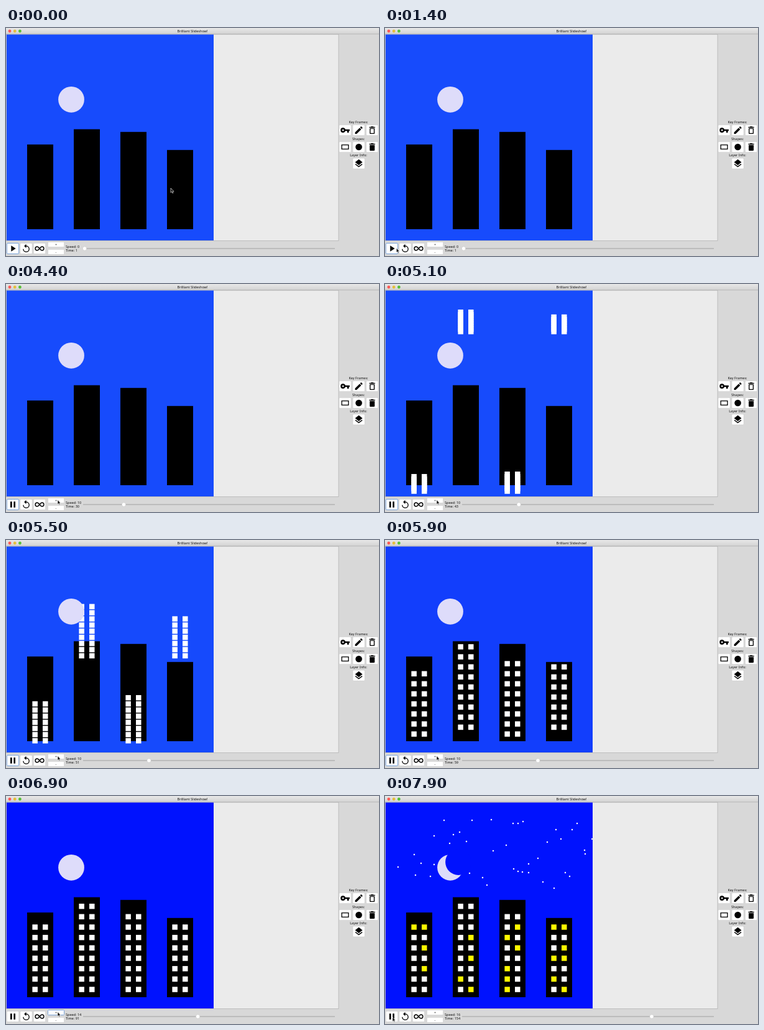
These frames come from a looping animation (600x366 px, 8 s). An HTML page:

```html
<!DOCTYPE html>
<html lang="en">
<head>
<meta charset="utf-8">
<title>Night city</title>
<style>
html, body { margin: 0; width: 100%; height: 100%; overflow: hidden; background: #d8d8d8; }
svg { display: block; width: 100vw; height: 100vh; }
text { font: 5.5px "Noto Sans", "Open Sans", sans-serif; fill: #111; }
.mid { text-anchor: middle; }
.btn { fill: #fff; stroke: #c6c6c6; stroke-width: .5; }
.focus { stroke: #79a3d8; stroke-width: 1; }
</style>
</head>
<body>
<svg viewBox="0 0 600 366">
  <defs>
    <linearGradient id="bar" x2="0" y2="1"><stop stop-color="#e8e8e8"/><stop offset="1" stop-color="#d2d2d2"/></linearGradient>
    <clipPath id="clip"><rect x="1" y="10.5" width="333" height="330.5"/></clipPath>
  </defs>
  <rect width="600" height="366" fill="#d8d8d8"/>
  <rect width="600" height="10" fill="url(#bar)"/>
  <path d="M0 9.7H600" stroke="#b0b0b0" stroke-width=".7"/>
  <circle cx="6" cy="5" r="2.4" fill="#fc5b57"/>
  <circle cx="14.2" cy="5" r="2.4" fill="#e5bf3c"/>
  <circle cx="22.4" cy="5" r="2.4" fill="#57c038"/>
  <text class="mid" x="300" y="7">Brilliant Slideshow!</text>
  <rect x=".5" y="10.2" width="534.5" height="331.3" fill="#ebebeb" stroke="#b5b5b5" stroke-width=".8"/>
  <g id="scene" clip-path="url(#clip)"></g>
  <g id="ui">
    <text class="mid" x="567" y="153">Key Frames:</text>
    <text class="mid" x="567" y="179.5">Shapes:</text>
    <text class="mid" x="567" y="206.3">Layer Info:</text>
    <text id="speed" x="96" y="352.8"></text>
    <text id="time" x="96" y="359.3"></text>
    <path d="M124 354H529" stroke="#a0a0a0" stroke-width="1"/>
    <circle id="thumb" cy="354" r="3.2" fill="#fff" stroke="#bdbdbd" stroke-width=".5"/>
  </g>
  <path id="cursor" d="M0 0V7.2L1.7 5.7 2.9 8.2 4 7.7 2.9 5.3H5z" fill="#111" stroke="#fff" stroke-width=".6"/>
</svg>
<script>
const $ = id => document.getElementById(id);

function add(parent, tag, attrs) {
  const el = document.createElementNS("http://www.w3.org/2000/svg", tag);
  set(el, attrs);
  return parent.appendChild(el);
}
function set(el, attrs) {
  for (const k in attrs) el.setAttribute(k, attrs[k]);
}
const mix = (a, b, k) => a + (b - a) * k;
const ramp = (v, from, to) => Math.min(1, Math.max(0, (v - from) / (to - from)));
const blend = (a, b, k) => `rgb(${a.map((v, i) => Math.round(mix(v, b[i], k)))})`;

// Piecewise linear value; keys are [position, value]
function track(keys, v) {
  const i = keys.findIndex(k => k[0] > v);
  if (i < 0) return keys[keys.length - 1][1];
  if (i === 0) return keys[0][1];
  const [a, b] = [keys[i - 1], keys[i]];
  return mix(a[1], b[1], (v - a[0]) / (b[0] - a[0]));
}

// Toolbar
const BIN = "M6 19c0 1.1.9 2 2 2h8c1.1 0 2-.9 2-2V7H6z";
const PLAY = "M8 5v14l11-7z", PAUSE = "M6 5h4v14H6zM14 5h4v14h-4z";
function button(x, y, d, stroke) {
  const box = add($("ui"), "rect", { class: "btn", x: x - 9.6, y: y - 8.5, width: 19.2, height: 17, rx: 1.5 });
  const icon = add($("ui"), "path", { d, transform: `translate(${x - 8} ${y - 8}) scale(.667)`, "fill-rule": "evenodd" });
  if (stroke) set(icon, { fill: "none", stroke: "#000", "stroke-width": stroke });
  return { box, icon };
}
button(545.5, 164, "M12.65 10C11.83 7.67 9.61 6 7 6a6 6 0 0 0 0 12c2.61 0 4.83-1.67 5.65-4H17v4h4v-4h2v-4zM7 14a2 2 0 0 1 0-4 2 2 0 0 1 0 4z");
button(567.5, 164, "M3 17.25V21h3.75L17.81 9.94l-3.75-3.75zM20.71 7.04c.39-.39.39-1.02 0-1.41l-2.34-2.34c-.39-.39-1.02-.39-1.41 0l-1.83 1.83 3.75 3.75z");
button(589, 164, BIN + "M8 9h8v10H8zM15.5 4l-1-1h-5l-1 1H5v2h14V4z");
button(545.5, 191, "M4 7H20V17H4z", 2);
button(567.5, 191, "M4 12a8 8 0 0 1 16 0 8 8 0 0 1-16 0z");
button(589, 191, BIN + "M19 4h-3.5l-1-1h-5l-1 1H5v2h14z");
button(567.5, 217.5, "M12 18.54l-7.37-5.73L3 14.07l9 7 9-7-1.63-1.27zM12 16l7.36-5.73L21 9l-9-7-9 7 1.63 1.27z");
const play = button(11, 354, PLAY);
button(32.5, 354, "M12 5V1L7 6l5 5V7a6 6 0 1 1-6 6H4a8 8 0 1 0 8-8z");
button(54, 354, "M12 12C9.5 9 8.2 7.5 6.2 7.5a4.5 4.5 0 0 0 0 9C8.2 16.5 9.5 15 12 12S15.8 7.5 17.8 7.5a4.5 4.5 0 0 1 0 9C15.8 16.5 14.5 15 12 12z", 2.2);
const [plus] = ["+", "-"].map((sign, i) => {
  const y = 343.6 + 12 * i;
  const box = add($("ui"), "rect", { class: "btn", x: 67.5, y, width: 26, height: 8, rx: 1 });
  add($("ui"), "text", { class: "mid", x: 80.5, y: y + 6 }).textContent = sign;
  return box;
});

// City
const SKY = [[23, 75, 252], [0, 18, 254]];
const WHITE = [255, 255, 255], YELLOW = [255, 249, 0];
const STEP = 16.68;
// Lit windows per row, top to bottom: 1 left, 2 right, 3 both
const TOWERS = [
  { top: 187, from: 335, lit: "3020200" },
  { top: 162.5, from: 1, lit: "000202012" },
  { top: 166.8, from: 335, lit: "02120111" },
  { top: 195.8, from: 1, lit: "3023012" }
];
const STARS = [
  95,39, 140,39, 171,38, 206,44, 214,44, 222,41, 309,44, 275,54, 301,54, 110,62,
  120,58, 79,64, 104,76, 131,73, 195,79, 174,88, 261,74, 283,69, 333,69, 321,87,
  322,93, 47,94, 58,108, 79,110, 21,114, 49,127, 73,129, 136,124, 157,131, 164,143,
  207,117, 214,121, 221,122, 231,123, 231,109, 246,100, 290,123, 297,129, 254,138, 272,148
];
const scene = $("scene");
const sky = add(scene, "rect", { y: 10, width: 335, height: 332 });
const panes = [];
TOWERS.forEach(({ top, from, lit }, i) => {
  const x = 34 + 75 * i;
  add(scene, "rect", { x, y: top, width: 42, height: 323 - top });
  [...lit].forEach((code, row) => [1, 2].forEach(side => panes.push({
    el: add(scene, "rect", { x: x - 8.2 + 16.6 * side, width: 8.5, height: 8.5 }),
    from,
    to: 306.3 - STEP * (lit.length - 1 - row),
    lit: code & side
  })));
});
add(scene, "circle", { cx: 105, cy: 114.8, r: 20.9, fill: "#dedcfa" });
const shade = add(scene, "circle", { r: 20.9 });
const stars = [];
for (let i = 0; i < STARS.length; i += 2)
  stars.push(add(scene, "circle", { cx: STARS[i], cy: STARS[i + 1], r: 1.25, fill: "#f4f4ff" }));

// Timing
const TICKS = [[1600, 1], [2700, 15], [2800, 15], [3000, 17], [3800, 24], [4000, 26], [4400, 30], [5500, 51],
  [5900, 59], [6600, 76], [6900, 91], [7200, 103], [7400, 117], [7700, 138], [7900, 154]];
const THUMB = [[1, 126.5], [15, 157.5], [30, 189.5], [51, 230], [59, 246], [76, 280], [154, 429]];
const CURSOR_X = [[0, 265], [400, 100], [600, 70], [1000, 24], [1600, 15.5], [3400, 15.5], [4200, 80], [4400, 83], [7400, 83], [7900, 12]];
const CURSOR_Y = [[0, 257], [400, 338], [600, 350], [1000, 354], [1600, 353], [3400, 353], [4200, 348], [4400, 346.5], [7400, 346.5], [7900, 355]];
const CLICKS = [6200, 6300, 6500, 6900, 7200, 7300];
// Moments at which the picture stands still
const HELD = [5, 15, 17, 18, 29, 41, 45, 49, 52, 64, 67, 68, 70, 71, 75, 76];

function draw(ms) {
  let beat = Math.floor(ms / 100);
  while (HELD.includes(beat)) beat--;
  const t = beat * 100;
  const tick = track(TICKS, t) + 1e-6;
  const running = t >= 1600;
  const clicks = CLICKS.filter(c => c <= t).length;

  const blue = blend(SKY[0], SKY[1], ramp(tick, 50, 91));
  set(sky, { fill: blue });
  const fall = ramp(tick, 38.4, 59.7);
  const glow = blend(WHITE, YELLOW, ramp(tick, 120, 150));
  for (const p of panes)
    set(p.el, {
      y: mix(p.from, p.to, fall),
      fill: p.lit ? glow : "#fff",
      visibility: tick > 37.5 ? "visible" : "hidden"
    });
  const cover = ramp(tick, 100, 150);
  set(shade, {
    cx: mix(139.5, 118, cover), cy: mix(91, 106, cover), fill: blue,
    visibility: cover > 0 ? "visible" : "hidden"
  });
  stars.forEach((s, i) => set(s, { visibility: tick > 100 + i * 7 % 17 ? "visible" : "hidden" }));

  $("speed").textContent = "Speed: " + (running ? 10 + clicks : 0);
  $("time").textContent = "Time: " + Math.floor(tick);
  set($("thumb"), { cx: track(THUMB, tick) });
  set(play.icon, { d: running ? PAUSE : PLAY });
  set(play.box, { class: clicks ? "btn" : "btn focus" });
  set(plus, { class: clicks && t < 7700 ? "btn focus" : "btn" });
  set($("cursor"), { transform: `translate(${track(CURSOR_X, t)} ${track(CURSOR_Y, t)})` });
}

const start = performance.now();
function loop() {
  draw((performance.now() - start) % 8000);
  requestAnimationFrame(loop);
}
loop();
</script>
</body>
</html>
```
